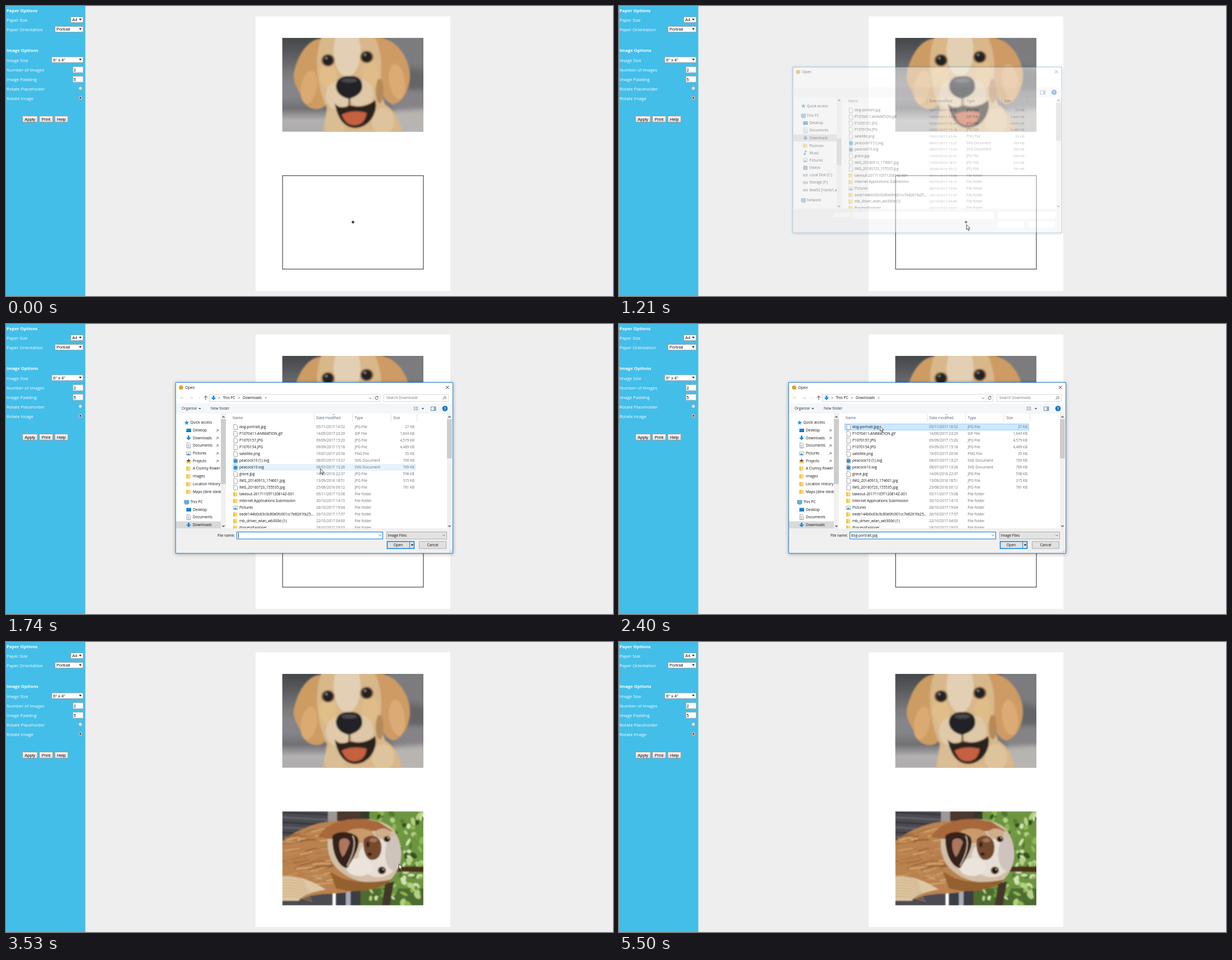
These frames come from a looping animation (1082x518 px, 6.05 s). An HTML page:

```html
<!DOCTYPE html>
<html lang="en">
<head>
<meta charset="utf-8">
<title>Photo print layout</title>
<style>
html, body { margin: 0; width: 100%; height: 100%; overflow: hidden; background: #eee; }
svg { display: block; width: 1082px; height: 518px; }
text { font-family: "Open Sans", "Noto Sans", sans-serif; white-space: pre; }
.form text { font-family: "Liberation Sans", Arial, sans-serif; }
</style>
</head>
<body>
<svg id="stage" viewBox="0 0 1082 518" xmlns="http://www.w3.org/2000/svg"></svg>
<script>
const LOOP = 6050;

// ---- drawing helpers ----
const rect = (x, y, w, h, fill, stroke = 'none', sw = 1, extra = '') =>
  `<rect x="${x}" y="${y}" width="${w}" height="${h}" fill="${fill}" stroke="${stroke}" stroke-width="${sw}" ${extra}/>`;
const path = (d, fill, stroke = 'none', sw = 1) =>
  `<path d="${d}" fill="${fill}" stroke="${stroke}" stroke-width="${sw}"/>`;
const line = (d, stroke, sw = 1) => path(d, 'none', stroke, sw);
const oval = (x, y, rx, ry, fill, turn = 0) =>
  `<ellipse cx="${x}" cy="${y}" rx="${rx}" ry="${ry}" fill="${fill}" transform="rotate(${turn} ${x} ${y})"/>`;
const text = (x, y, str, size = 6.5, fill = '#111', extra = '') =>
  `<text x="${x}" y="${y + size * 0.36}" font-size="${size}" fill="${fill}" ${extra}>${str}</text>`;
const group = (body, attrs = '') => `<g ${attrs}>${body}</g>`;
const clip = (id, x, y, w, h) => `<clipPath id="${id}">${rect(x, y, w, h, '#000')}</clipPath>`;
const fade = (id, ...stops) => `<linearGradient id="${id}" x1="0" y1="0" x2="0" y2="1">` +
  stops.map((c, i) => `<stop offset="${i / (stops.length - 1)}" stop-color="${c}"/>`).join('') + '</linearGradient>';
const down = (x, y, r, fill) => path(`M${x - r} ${y - r / 2}h${2 * r}l${-r} ${r * 1.3}z`, fill);
const chevron = (x, y, c = '#555', s = 1) => line(`M${x - 2} ${y - s}l2 ${2 * s}l2 ${-2 * s}`, c, 0.9);

let seed = 7;
const rnd = (a = 0, b = 1) => {
  seed = (seed * 16807) % 2147483647;
  return a + (b - a) * seed / 2147483647;
};
const pick = list => list[Math.floor(rnd(0, list.length))];
const many = (n, make) => Array.from({ length: n }, (_, i) => make(i)).join('');

const defs = `<defs>
${clip('photoA', 492.5, 57, 251.5, 167.5)}${clip('photoB', 492.5, 302.5, 251.5, 168)}
${clip('tree', 303, 160, 80, 205)}${clip('list', 394, 160, 392, 205)}
${fade('wall', '#45484a', '#535558', '#66676a', '#7a7a7c', '#868589', '#858488', '#717074', '#b2b0b0', '#aeacac')}
${fade('btn', '#f8f8f8', '#dcdcdc')}
<filter id="soft"><feGaussianBlur stdDeviation="1.5"/></filter>
<filter id="softer"><feGaussianBlur stdDeviation="4"/></filter>
<filter id="crisp"><feGaussianBlur stdDeviation=".9"/></filter>
<filter id="shade" x="-5%" y="-5%" width="110%" height="110%"><feDropShadow dx="0" dy="1" stdDeviation="3" flood-opacity=".35"/></filter>
</defs>`;

// ---- option panel ----
function panel() {
  const label = (y, s, bold) => text(1, y, s, 7.75, '#fff', bold ? 'font-weight="700"' : '');
  const select = (x, y, s) => rect(x + .5, y + .5, 137 - x, 10, '#fff', '#a5a5a5') +
    text(x + 3, y + 5.3, s, 7.5) + down(132.5, y + 5, 2.3, '#111');
  const input = (y, s) => rect(119.5, y + .5, 18, 10.5, '#fff', '#b5b5b5') + text(120.5, y + 6, s, 7.5);
  const button = (x, w, s) => rect(x + .5, 196.5, w - 1, 11, 'url(#btn)', '#999', 1, 'rx="1"') +
    text(x + w / 2, 202.2, s, 7.5, '#111', 'text-anchor="middle"');
  const radio = (y, on) => `<circle cx="132.5" cy="${y}" r="3.2" fill="#e2e2e2" stroke="#999" stroke-width=".8"/>` +
    (on ? oval(132.5, y, 1.7, 1.7, '#444') : '');
  const labels = label(8, 'Paper Options', 1) + label(25.5, 'Paper Size') + label(42.5, 'Paper Orientation') +
    label(79.5, 'Image Options', 1) + label(97, 'Image Size') + label(114, 'Number of images') +
    label(131, 'Image Padding') + label(148, 'Rotate Placeholder') + label(165.5, 'Rotate Image');
  return rect(0, 0, 141.4, 518, '#43bee9') + labels + group(
    select(115, 19, 'A4') + select(87, 36, 'Portrait') + select(81, 90.5, '6&quot; x 4&quot;') +
    input(108, '2') + input(125, '5') + radio(147, false) + radio(164, true) +
    button(29, 27.5, 'Apply') + button(59, 25, 'Print') + button(86.5, 24.5, 'Help'), 'class="form"');
}

// ---- pictures, kept as loose shapes ----
function dogA() {
  const back = rect(492, 57, 253, 168, 'url(#wall)') + group(
    path('M676 50H750V112L690 104Z', '#7c7c7e') + path('M690 104L750 118V150L700 150Z', '#656568') +
    path('M680 150L750 152V186L690 188Z', '#858386') + path('M690 188L750 184V230H680Z', '#b8b4b1'), 'filter="url(#softer)"');
  const ears = path('M562 58C536 60 520 90 514 116C508 138 524 150 528 166C536 186 560 190 570 176L572 80Z', '#cd9c64') +
    path('M648 54C690 52 712 82 719 112C724 138 712 170 690 176C676 172 668 156 664 136Z', '#cd9b64') +
    oval(540, 145, 14, 30, '#dbaa72', 10) + oval(697, 135, 14, 32, '#dcab74', -8);
  const head = path('M564 52H655C670 76 672 112 666 150L676 176C696 188 704 208 706 230H564L572 182C556 150 546 90 564 52Z', '#d8b78a') +
    oval(608, 80, 24, 46, '#e3d0b4') + oval(574, 124, 15, 24, '#e1bd88') + oval(649, 122, 14, 26, '#e0bc88') +
    oval(592, 160, 22, 26, '#e0caaa') + oval(634, 158, 21, 26, '#dfc8a7') + oval(586, 210, 18, 24, '#d9bd94') +
    oval(672, 206, 20, 24, '#dec49c') + oval(666, 152, 7, 22, '#b58a58');
  const eye = (x, y) => oval(x, y, 12, 11, '#8a6647') + oval(x, y, 9.5, 9.5, '#222120') + oval(x - 3, y - 4, 2, 2, '#8e8e8c');
  const face = eye(574, 97) + eye(643, 91) +
    path('M586 174C594 184 604 181 613 177C630 182 646 178 658 168C664 184 652 217 622 218C600 217 590 196 586 174Z', '#2a211e') +
    path('M598 194C612 187 630 187 643 191C640 209 630 213 621 213C610 213 604 207 598 194Z', '#c5603f') +
    path('M588 143C590 125 606 125 613 125C628 124 636 132 635 145C634 158 620 163 612 166C602 164 589 158 588 143Z', '#202225') +
    oval(612, 133, 14, 4, '#47494b') + line('M612 165V180', '#3a2c25', 2.5);
  return group(back + group(ears + head + face, 'filter="url(#soft)"'), 'clip-path="url(#photoA)"');
}

function dogB() {
  const greens = ['#35521f', '#4f7a2e', '#6f9b40', '#8fb855', '#b4d284', '#d3e4ae'];
  const furs = ['#8f5a31', '#c48c56', '#dab07c', '#ae7440'];
  const wood = rect(492, 302, 90, 169, '#4c4c51') + many(6, i => line(`M492 ${304 + i * 9}L582 ${309 + i * 9}`, i % 2 ? '#6b6c73' : '#2c2b30', 2)) +
    rect(574, 302, 16, 32, '#9d9895') + rect(590, 302, 42, 169, '#4b392f') + rect(632, 302, 18, 169, '#38372a') +
    path('M588 445H630V471H588Z', '#3b3d46') + rect(606, 445, 8, 26, '#a8adb7');
  const leaves = rect(648, 302, 97, 169, '#6d9541') + rect(632, 440, 113, 31, '#4d6c31') +
    many(110, () => oval(rnd(650, 744), rnd(303, 471), rnd(3, 8), rnd(2, 5), pick(greens), rnd(0, 180))) +
    path('M684 401L745 401V411L684 410Z', '#49301f') + path('M676 430L692 428L684 471H670Z', '#43372a');
  const body = path('M492 356C520 334 560 318 600 320L640 330L632 440C600 455 560 444 530 458L492 458Z', '#b98250') +
    many(75, () => {
      const x = rnd(490, 575), y = rnd(338, 436);
      return line(`M${x} ${y}q${rnd(10, 18)} ${rnd(-7, 1)} ${rnd(22, 34)} ${rnd(-9, -1)}`, pick(furs), rnd(.7, 2.2));
    }) + path('M492 418C520 416 545 426 570 442C550 446 530 450 522 462H492Z', '#dfc8a5') +
    many(8, i => line(`M492 ${420 + i * 5}q22 -3 ${40 + i * 2} 8`, '#c39a67', 1));
  const head = path('M578 340C600 312 662 308 690 334C710 362 710 398 686 424C654 438 610 428 586 400C572 380 570 356 578 340Z', '#d3bfa8') +
    path('M556 348C574 318 620 310 664 321L690 338C664 336 630 338 600 344L580 352Z', '#a8683a') +
    path('M578 410C600 428 640 434 688 424C670 444 620 450 588 440Z', '#94602f') +
    oval(664, 386, 36, 34, '#e6dfd6') + oval(630, 346, 26, 13, '#c99a6c') + oval(690, 378, 14, 30, '#cfc4bd') +
    oval(630, 402, 24, 16, '#ebe4da') + oval(672, 342, 14, 9, '#cfae8c');
  const face = path('M582 346C592 336 616 338 626 348C634 360 622 382 608 404C592 402 580 374 582 346Z', '#34241f') +
    path('M595 354C602 348 611 351 613 358C609 369 604 382 600 384C595 376 592 363 595 354Z', '#ad7661') +
    line('M618 346C626 362 616 384 608 400', '#cdb9a4', 2) +
    path('M638 352C650 341 666 346 669 362C671 380 662 391 650 389C640 386 635 366 638 352Z', '#75492f') +
    oval(655, 354, 7, 4, '#a17452') + oval(645, 362, 3, 5, '#3e2218') + oval(648, 379, 4, 3, '#3e2218') +
    oval(679, 352, 6.5, 5.5, '#8a6546') + oval(670, 408, 7.5, 7, '#8a6546') +
    oval(679, 352, 4.3, 4.5, '#201918') + oval(670, 408, 5, 5.5, '#201918') + oval(681, 350, 1, 1, '#fff') + oval(672, 406, 1, 1, '#fff');
  return group(group(wood + leaves + body + head + face, 'filter="url(#crisp)"'), 'clip-path="url(#photoB)"');
}

// ---- file dialog ----
const icons = {
  file: (x, y) => path(`M${x - 3} ${y - 4.5}h4l2.5 2.5v6.5h-6.5z`, '#fff', '#8c8c8c', .8),
  dir: (x, y) => rect(x - 4, y - 3.5, 7.5, 7.5, '#f9d978') + rect(x - 4, y - 3.5, 3, 7.5, '#f2c44c'),
  web: (x, y) => icons.file(x, y) + oval(x, y + .5, 3.2, 3.2, '#2d8fd5'),
  pic: (x, y) => rect(x - 4, y - 2.8, 8, 6, '#e9f2f8', '#8aa', .7) + path(`M${x - 3.5} ${y + 3}l3 -3l4 3z`, '#3c86bd'),
  doc: (x, y) => icons.file(x, y) + line(`M${x - 1.5} ${y - 1}h3m-3 2h3m-3 2h3`, '#4a86b8', .7),
  pc: (x, y) => rect(x - 4, y - 3, 8, 5.5, '#59b8ee', '#46789a', .7) + line(`M${x - 3} ${y + 4}h6`, '#607d8f', 1),
  desk: (x, y) => rect(x - 4, y - 3, 8.5, 6, '#1683d8') + line(`M${x - 4} ${y + 2.5}h8.5`, '#0b4f8a', 1),
  save: (x, y) => path(`M${x - 1.5} ${y - 4}h3v3.5h3l-4.5 4.5l-4.5 -4.5h3z`, '#2387d1'),
  star: (x, y, c = '#2f93dd') => path(`M${x} ${y - 4.2}l1.2 2.9l3 .2l-2.3 2l.8 3.1l-2.7 -1.7l-2.7 1.7l.8 -3.1l-2.3 -2l3 -.2z`, c),
  gold: (x, y) => icons.star(x, y, '#4b4436') + rect(x - 4, y + 1, 7.5, 3, '#f2c44c'),
  note: (x, y) => line(`M${x} ${y + 2}v-6l3 2`, '#1d86d6', 1.2) + oval(x - 1.4, y + 2.3, 2, 1.6, '#1d86d6'),
  film: (x, y) => rect(x - 3.5, y - 3.5, 7, 7, '#56616a') + rect(x - 2, y - 2.5, 4, 5, '#8fb9d8'),
  disk: (x, y) => rect(x - 4, y - 1.5, 8, 3.5, '#b9bec2', '#777', .6),
};

// icon, name, modified, type, size
const files = `file|dog-portrait.jpg|05/11/2017 16:52|JPG File|27 KB
file|P1070411-ANIMATION.gif|14/09/2017 23:29|GIF File|1,643 KB
file|P1070157.JPG|09/09/2017 15:20|JPG File|4,579 KB
file|P1070154.JPG|09/09/2017 15:18|JPG File|4,489 KB
file|satellite.png|19/07/2017 20:56|PNG File|35 KB
web|peacock10 (1).svg|08/07/2017 13:27|SVG Document|769 KB
web|peacock10.svg|08/07/2017 13:26|SVG Document|769 KB
file|grace.jpg|14/09/2016 22:37|JPG File|598 KB
file|IMG_20140913_174601.jpg|13/09/2016 18:51|JPG File|315 KB
file|IMG_20160723_155535.jpg|25/08/2016 00:12|JPG File|781 KB
dir|takeout-20171105T120814Z-001|05/11/2017 15:08|File folder|
dir|Internet Applications Submission|30/10/2017 14:15|File folder|
pic|Pictures|28/10/2017 19:04|File folder|
dir|eede144b0c63c0c80e0fc001cc7e8261fa25...|26/10/2017 17:57|File folder|
dir|mb_driver_wlan_wb300d (1)|22/10/2017 04:00|File folder|
dir|ProcessExplorer|18/10/2017 19:03|File folder|`.split('\n').map(r => r.split('|'));

function fileList() {
  const head = (x, s) => text(x, 167.5, s, 6.5, '#4c607a');
  const rows = files.map(([icon, name, date, type, size], i) => {
    const y = 184 + i * 12;
    return icons[icon](409, y) + text(416, y, name, 6.5) + text(553, y, date, 6.3, '#6d6d6d') +
      text(621.5, y, type, 6.5, '#6d6d6d') + text(728, y, size, 6.3, '#6d6d6d', 'text-anchor="end"');
  }).join('');
  return group(rect(394, 160.5, 155, 14, '#d9ebf9', 'none', 1, 'id="headHover"') +
    rect(402, 178, 329, 12, '#e5f3ff', 'none', 1, 'id="hover"') +
    rect(402.5, 178.5, 328, 11, '#cce8ff', '#99d1ff', 1, 'id="picked"') +
    head(404, 'Name') + head(553, 'Date modified') + head(622, 'Type') + head(690.5, 'Size') +
    line('M549.5 161v13M617.5 161v13M686.5 161v13M732.5 161v13', '#e2e2e2') +
    line('M582 163l2 -2l2 2', '#888', .8) + rows, 'clip-path="url(#list)"');
}

const scrollbar = (x, y, h) => rect(x, 160, 9, 205, '#f0f0f0') + rect(x, y, 9, h, '#cdcdcd') +
  line(`M${x + 2.5} 167l2 -2l2 2M${x + 2.5} 360l2 2l2 -2`, '#444', 1.1);

function tree(items, mark) {
  const rows = items.map(([icon, s, y, root, pin]) => icons[icon](root ? 322 : 325.5, y) +
    text(root ? 328.5 : 333, y, s, 6.5) +
    (pin ? line(`M374.5 ${y + 2.5}l2 -2m-1 -2l3 3m-2 -3.5l3 3m-2 -1.5l1 -1`, '#777', 1) : '')).join('');
  return group(rect(303, mark - 6.5, 80, 13, '#d9d9d9') + rows, 'clip-path="url(#tree)"');
}

function dialog() {
  const blank = (x, y, w, h) => rect(x, y, w, h, '#fff', '#eee');
  const base = rect(302.5, 104.5, 494, 305, '#fff', '#2f86cf', 1, 'filter="url(#shade)"') +
    rect(303, 142, 493, 18, '#f5f6f7') + rect(303, 365, 493, 44, '#f0f0f0') +
    oval(312, 113.5, 3.8, 3.8, '#d9a42b') + text(319.5, 113.5, 'Open', 6.7) +
    line('M784 110.5l5.5 5.5m0 -5.5l-5.5 5.5', '#222', .9) +
    fileList() + scrollbar(786, 170, 70) +
    rect(757.5, 148, 8.5, 6.5, '#fff', '#5b7da0', .9) + rect(762.5, 148, 3.5, 6.5, '#79a9d6') +
    oval(782.5, 151, 4.8, 4.8, '#1272c4') + text(782.5, 151.2, '?', 7, '#fff', 'text-anchor="middle" font-weight="700"');

  const early = tree([['star', 'Quick access', 176, 1], ['pc', 'This PC', 194, 1], ['desk', 'Desktop', 207.5], ['doc', 'Documents', 221],
    ['save', 'Downloads', 235], ['dir', 'Plumvox', 249], ['note', 'Music', 262.5], ['pic', 'Pictures', 276], ['film', 'Videos', 290],
    ['disk', 'Local Disk (C:)', 303.5], ['disk', 'Storage (F:)', 317], ['disk', 'bkw52 (\\\\smb1.a', 331], ['pc', 'Network', 349.5, 1]], 235) +
    scrollbar(383, 236, 49) + blank(377, 373, 31, 8) + blank(411, 370.5, 261, 14) + blank(678, 370.5, 108, 14) +
    blank(678, 388, 50, 13) + blank(735, 388, 50, 13);

  const ink = '#1e395b';
  const late = tree([['star', 'Quick access', 176, 1], ['desk', 'Desktop', 190, 0, 1], ['save', 'Downloads', 203.5, 0, 1], ['doc', 'Documents', 217, 0, 1],
    ['pic', 'Pictures', 231, 0, 1], ['gold', 'Projects', 244.5, 0, 1], ['dir', 'A Clumsy Rower', 258], ['dir', 'images', 272],
    ['dir', 'Location History', 286], ['dir', 'Maps (dine steder)', 299.5], ['pc', 'This PC', 318, 1], ['desk', 'Desktop', 331.5],
    ['doc', 'Documents', 345], ['save', 'Downloads', 359]], 359) + scrollbar(383, 170, 116) +
    line('M317 132h-6m2.5 -2.5l-2.5 2.5l2.5 2.5M327 132h6m-2.5 -2.5l2.5 2.5l-2.5 2.5M343 131.5l1.5 1.5l1.5 -1.5', '#cfcfcf', .9) +
    line('M356 135.5v-7m-3 3l3 -3l3 3', '#444', 1) +
    rect(362.5, 125.5, 304, 13, '#fff', '#d9d9d9') + line('M654.5 126v12', '#e3e3e3') + icons.save(370, 132) +
    line('M379 130l1.8 1.8l-1.8 1.8M414.5 130l1.8 1.8l-1.8 1.8M462 130l1.8 1.8l-1.8 1.8', '#555', .9) +
    text(386.5, 132, 'This PC', 6.5) + text(422, 132, 'Downloads', 6.5) + chevron(649, 132.5) +
    line('M662.5 130.2a2.6 2.6 0 1 0 .8 2M663 128.5v2h-2', '#444', .9) +
    rect(673.5, 125.5, 115, 13, '#fff', '#d9d9d9') + text(678, 132, 'Search Downloads', 6.5, '#777') +
    line('M778.5 135l2.3 -2.3a2 2 0 1 1 1 .8', '#555', .9) +
    text(313, 151, 'Organise', 6.5, ink) + down(345.5, 151, 2, ink) + text(365, 151, 'New folder', 6.5, ink) +
    line('M726.5 148.5h3m1 0h4m-8 2.5h3m1 0h4m-8 2.5h3m1 0h4', '#7c8a99', 1) + down(743, 151, 2, ink) +
    text(408, 377.5, 'File name:', 6.5, '#111', 'text-anchor="end"') +
    rect(411.5, 371.5, 260, 12.5, '#fff', '#0078d7', 1, 'id="field"') + chevron(666.5, 377.5) +
    rect(414, 373, .9, 9.5, '#111', 'none', 1, 'id="caret"') + group(text(413.5, 377.8, 'dog-portrait.jpg', 6.5), 'id="fileName"') +
    rect(678.5, 371.5, 107, 12.5, '#e3e3e3', '#adadad', 1, 'id="combo"') + text(680.5, 377.5, 'Image Files', 6.5) + chevron(780.5, 377.5) +
    rect(679.5, 388.5, 48, 12.5, '#e1e1e1', '#0078d7', 1.4, 'id="openBtn"') + line('M719.5 389v11.5', '#2a6ea5', .9) +
    text(699, 394.7, 'Open', 6.5, '#111', 'text-anchor="middle"') + down(724, 394.7, 2.3, '#111') +
    rect(736.5, 388.5, 48, 12.5, '#e1e1e1', '#adadad') + text(760.7, 394.7, 'Cancel', 6.5, '#111', 'text-anchor="middle"') +
    line('M790 408l5 -5m-2.5 5l2.5 -2.5', '#bbb', .9);
  return group(base + group(early, 'id="early"') + group(late, 'id="late"'), 'id="dialog"');
}

const stage = document.getElementById('stage');
stage.innerHTML = defs + rect(0, 0, 1082, 518, '#eee') + panel() + rect(445, 18.5, 347, 490.5, '#fff') + dogA() +
  group(rect(493, 303, 251, 167, '#fff', '#222') + line('M616 386h5M618.5 383.5v5', '#111', 1.6), 'id="slot"') +
  group(dogB(), 'id="filled"') + dialog() +
  group(path('M.4 .4V9.6L2.5 7.7L4.1 11.3L5.5 10.7L4 7.2H6.8Z', '#fff', '#222', .75), 'id="cursor"');

// ---- pointer track: it jumps from stop to stop ----
const stops = [];
const stop = (t, x, y) => stops.push({ t, x, y });
const glide = (t0, t1, n, [x0, y0], [x1, y1]) => {
  for (let i = 0; i < n; i++) {
    const k = i / (n - 1), e = k * k * (3 - 2 * k);
    stop(Math.floor((t0 + (t1 - t0) * k) / 10) * 10, Math.round(x0 + (x1 - x0) * e), Math.round(y0 + (y1 - y0) * e));
  }
};
glide(100, 660, 6, [968, 499], [619, 394]);
stop(880, 619, 390);
stop(1310, 616, 362);
stop(1410, 610, 326);
stop(1530, 603, 308);
stop(1630, 590, 288);
glide(1740, 1960, 3, [560, 258], [468, 169]);
stop(2070, 466, 178);
stop(2180, 465, 182);
glide(2510, 2950, 5, [472, 190], [699, 382]);
stop(3090, 700, 392);
stop(3180, 700, 396);
glide(4060, 4400, 4, [699, 398], [695, 402]);
stop(4510, 697, 403);
stop(4620, 699, 403);
glide(4720, 5280, 6, [712, 407], [1018, 502]);
stop(5400, 1030, 509);

// start, opacity, scale
const windowSteps = [[0, 0, 1], [1130, .13, .945], [1210, .45, .97], [1310, .88, .993], [1410, 1, 1], [3410, .45, .97], [3530, 0, 1]];

const $ = id => document.getElementById(id);
const show = (id, on) => { $(id).style.display = on ? '' : 'none'; };
const paint = (id, fill, stroke) => { $(id).setAttribute('fill', fill); $(id).setAttribute('stroke', stroke); };

function render(t) {
  const p = stops.filter(s => s.t <= t).pop();
  show('cursor', p && t < 5500);
  if (p) $('cursor').setAttribute('transform', `translate(${p.x} ${p.y})`);

  const [, alpha, scale] = windowSteps.filter(s => s[0] <= t).pop();
  show('dialog', alpha > 0);
  $('dialog').setAttribute('opacity', alpha);
  $('dialog').setAttribute('transform', `translate(549.3 257) scale(${scale}) translate(-549.3 -257)`);
  show('early', t < 1410);
  show('late', t >= 1410);
  show('slot', t < 3530);
  show('filled', t >= 3530);

  const picked = t >= 2400, left = t >= 3180;
  const row = p ? Math.floor((p.y - 178) / 12) : -1;
  show('hover', t >= 1410 && row >= (picked ? 1 : 0) && row < 16);
  $('hover').setAttribute('y', 178 + row * 12);
  show('headHover', t >= 1960 && t < 2070);
  show('picked', picked);
  show('fileName', picked);
  show('caret', t < 1960);
  paint('picked', left ? '#d9d9d9' : '#cce8ff', left ? '#d9d9d9' : '#99d1ff');
  paint('field', '#fff', left ? '#7a7a7a' : '#0078d7');
  if (t >= 2950) paint('combo', '#dbe6f0', '#6f9fc8'); else paint('combo', '#e3e3e3', '#adadad');
  paint('openBtn', t >= 3090 ? '#cce4f7' : '#e1e1e1', '#0078d7');
}

const start = performance.now();
(function tick() {
  render((performance.now() - start) % LOOP);
  requestAnimationFrame(tick);
})();
</script>
</body>
</html>
```
